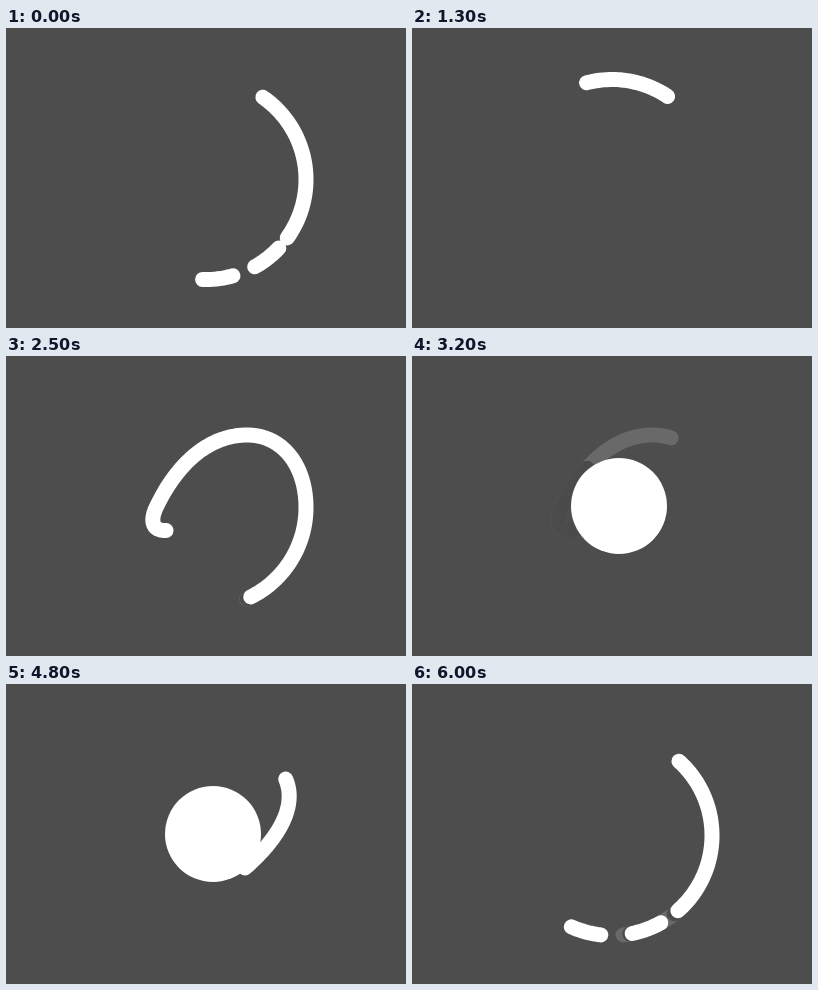
These frames come from a looping animation (400x300 px, 6.1 s). An HTML page with a canvas:

```html
<!DOCTYPE html>
<html lang="en">
<head>
<meta charset="utf-8">
<title>Loader</title>
<style>
  html, body { margin: 0; width: 100%; height: 100%; overflow: hidden; background: #4d4d4d; }
  canvas { display: block; }
</style>
</head>
<body>
<canvas id="stage" width="400" height="300"></canvas>
<script>
const ctx = document.getElementById('stage').getContext('2d');
const LOOP = 6100, STEP = 100, TRAILS_FROM = 1500;
const BACK = '#4d4d4d', FADED = '#4b4b4b', TRAIL = '#696969', INK = '#fff';
const CENTER = [200, 151.5], RADIUS = 100, DISC = [207, 150];
const DASH = 17.6, GAP_DIFFERENCE = 6;

const linear = k => k;
const quadIn = k => k * k;
const cubicIn = k => k * k * k;
const quadOut = k => 1 - (1 - k) ** 2;
const sineOut = k => Math.sin(k * Math.PI / 2);

// A track starts at a time and value, then eases to each later stop.
const track = (time, value, ...stops) => now => {
  for (const [end, target, ease] of stops) {
    if (now < end) {
      const k = Math.max(0, (now - time) / (end - time));
      return value + (target - value) * ease(k);
    }
    [time, value] = [end, target];
  }
  return value;
};
const makeTrack = (...args) => now => track(...args)(now);

// Path positions are degrees travelled counterclockwise.
const EXIT = -22, RING_IN = 55, RING_OUT = 720, HOOK_TOP = 775, HOOK_END = 846, FINISH = 890;

const head = makeTrack(4300, EXIT,
  [4600, 26, sineOut], [5600, 249, quadIn], [6000, 408, sineOut],
  [7500, 465, quadOut], [8500, HOOK_END, cubicIn], [8800, FINISH, sineOut]);
const tail = makeTrack(5400, EXIT,
  [5800, 246, sineOut], [6000, 246, linear], [7500, 417, quadOut],
  [8400, 654, cubicIn], [9300, FINISH, cubicIn]);
const dashGap = makeTrack(5600, 0, [6000, 18, sineOut], [6400, 0, linear]);
const discSize = makeTrack(4800, 48, [5200, 0, linear], [8600, 0, linear], [9000, 48, linear]);

const curves = [
  { from: EXIT, to: RING_IN, pts: [[239, 184], [287, 142], [300, 99], [257.4, 69.6]] },
  { from: RING_OUT, to: HOOK_TOP, pts: [[300, 151.5], [300, 110], [277, 79], [241, 79]] },
  { from: HOOK_TOP, to: HOOK_END, pts: [[241, 79], [200, 79], [168, 112], [149, 154]] },
  { from: HOOK_END, to: FINISH, pts: [[149, 154], [138, 182], [170, 182], DISC] }
];

function pointAt(u) {
  const curve = curves.find(c => u >= c.from && u <= c.to);
  if (curve) {
    const k = (u - curve.from) / (curve.to - curve.from), m = 1 - k;
    const weights = [m * m * m, 3 * m * m * k, 3 * m * k * k, k * k * k];
    return [0, 1].map(axis => curve.pts.reduce((sum, p, i) => sum + p[axis] * weights[i], 0));
  }
  const angle = -u * Math.PI / 180;
  return [CENTER[0] + RADIUS * Math.cos(angle), CENTER[1] + RADIUS * Math.sin(angle)];
}

function drawStroke(from, to) {
  if (to <= from) return;
  const count = Math.ceil((to - from) / 2);
  ctx.beginPath();
  for (let i = 0; i <= count; i++) ctx.lineTo(...pointAt(from + (to - from) * i / count));
  ctx.stroke();
}

function drawPose(t, color) {
  // The journey leaves the disc late in one loop and returns in the next.
  const time = t < 4000 ? t + LOOP : t;
  const end = head(time), gap = dashGap(time);
  let from = tail(time);
  ctx.strokeStyle = ctx.fillStyle = color;
  for (const space of [gap, gap - GAP_DIFFERENCE]) {
    if (space <= 0) continue;
    drawStroke(from, Math.min(end, from + DASH));
    from += DASH + space;
  }
  drawStroke(from, end);

  ctx.beginPath();
  ctx.arc(...DISC, discSize(time), 0, Math.PI * 2);
  ctx.fill();
}

function draw(now) {
  const t = Math.floor(now % LOOP / STEP) * STEP;
  ctx.fillStyle = BACK;
  ctx.fillRect(0, 0, 400, 300);
  ctx.lineWidth = 15;
  ctx.lineCap = ctx.lineJoin = 'round';
  if (t >= TRAILS_FROM) {
    drawPose(t - 2 * STEP, TRAIL);
    drawPose(t - STEP, FADED);
  }
  drawPose(t, INK);
}

const began = performance.now();
function tick() {
  draw(performance.now() - began);
  requestAnimationFrame(tick);
}
tick();
</script>
</body>
</html>
```
